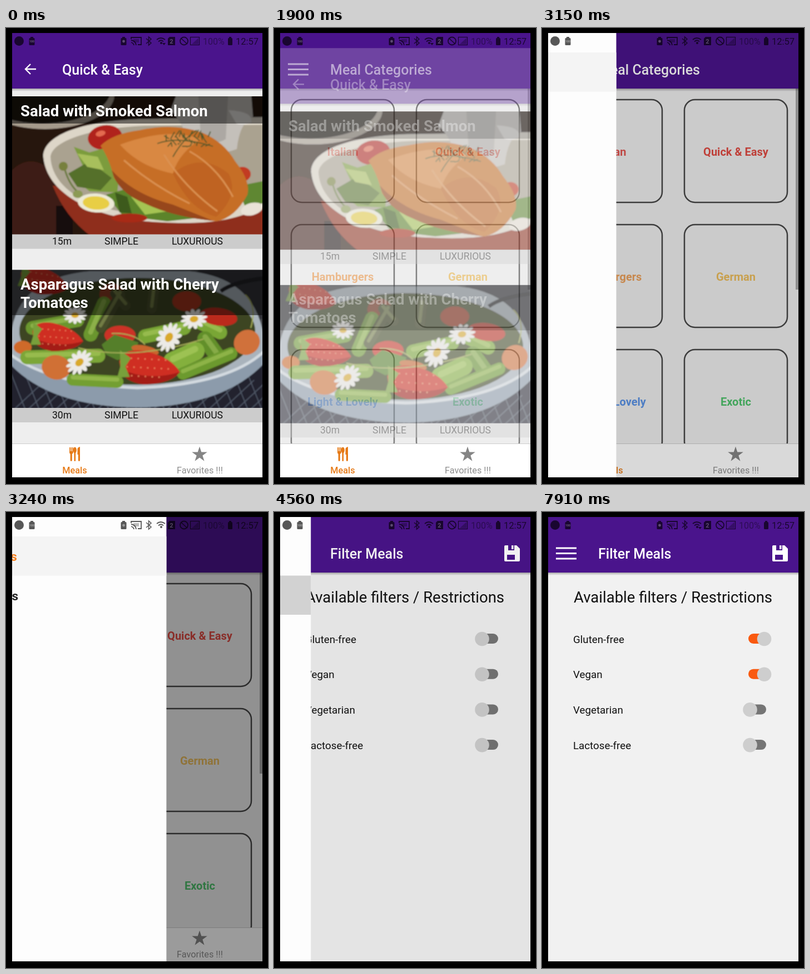
An HTML page that plays this animation: 471x821 px, repeating every 8000 ms.

```html
<!DOCTYPE html>
<html lang="en">
<head>
<meta charset="utf-8">
<title>Meals app</title>
<style>
html, body { margin: 0; width: 100%; height: 100%; overflow: hidden; background: #000; }
svg { display: block; font-family: Roboto, sans-serif; }
/* each layer of the leaving screen fades on its own */
#meals > * { opacity: var(--fade); }
#meals > .photo { opacity: var(--photo-fade); }
</style>
</head>
<body>
<svg id="stage" width="471" height="821" viewBox="0 0 471 821"></svg>
<script>
const LOOP = 8000, PURPLE = '#4a148c', ORANGE = '#f57f1e', TAB = '#e67a17';
const stage = document.getElementById('stage');

// markup helpers
const rect = (x, y, w, h, fill, more = '') => `<rect x="${x}" y="${y}" width="${w}" height="${h}" fill="${fill}" ${more}/>`;
const oval = (x, y, rx, ry, fill, turn = 0) => `<ellipse cx="${x}" cy="${y}" rx="${rx}" ry="${ry}" fill="${fill}" transform="rotate(${turn} ${x} ${y})"/>`;
const shape = (d, fill) => `<path d="${d}" fill="${fill}"/>`;
const line = (d, stroke, w, more = '') => `<path d="${d}" fill="none" stroke="${stroke}" stroke-width="${w}" ${more}/>`;
const text = (x, y, size, fill, str, weight = 400, anchor = 'start', more = '') =>
  `<text x="${x}" y="${y}" font-size="${size}" fill="${fill}" font-weight="${weight}" text-anchor="${anchor}" ${more}>${str}</text>`;
const group = (id, body, more = '') => `<g id="${id}" ${more}>${body}</g>`;
const stalk = (d, color, w) => line(d, color, w, 'stroke-linecap="round"') +
  line(d, 'rgba(215,235,130,.3)', w / 3, 'stroke-linecap="round" transform="translate(0 -4)"');

const header = (title, icon) =>
  rect(11, 109, 450, 5, 'url(#shade)') + rect(11, 9, 450, 100, PURPLE) + icon + text(101, 84, 25, '#fff', title, 500);
const burger = line('M25 65H62M25 74.5H62M25 84H62', '#fff', 3);
const arrow = line('M54 74H35M44 65L35 74L44 83', '#fff', 2.4);
const disk = shape('M416 60H436L442 66V87Q442 89 440 89H416Q414 89 414 87V62Q414 60 416 60Z', '#fff') +
  rect(419, 77, 14, 9, PURPLE) + rect(421, 60, 11, 9, PURPLE) + rect(427, 60, 3.5, 7, '#fff');

const meal = (y, photo, titleLines, duration) => {
  const bar = y + 248.5;
  return `<g class="photo"><svg x="11" y="${y}" width="450" height="249" viewBox="11 ${y} 450 249"><g filter="url(#soft)">${photo}</g></svg></g>` +
    rect(11, y, 450, 16.5 + 32.5 * titleLines.length, '#000', 'fill-opacity=".5"') +
    titleLines.map((s, i) => text(26, y + 35.5 + 32.5 * i, 27.5, '#fff', s, 700)).join('') +
    rect(11, bar, 450, 26, '#ccc') +
    text(83, bar + 18.5, 17.5, '#111', duration) +
    text(177, bar + 18.5, 17.5, '#111', 'SIMPLE') +
    text(298, bar + 18.5, 17.5, '#111', 'LUXURIOUS');
};

function dill() {
  let d = '';
  for (let i = 0; i < 30; i++) {
    const x = 288 + i * 2.6, y = 205 + 9 * Math.sin(i * 1.9);
    d += `M${x} ${y}l${9 * Math.sin(i * 2.4)} ${-13 * Math.abs(Math.cos(i))}`;
  }
  return line(d + 'M272 208Q310 194 372 213M300 232Q318 200 343 184', '#45552a', 1.8);
}

const salmonPhoto =
  rect(0, 110, 480, 270, '#27140e') +
  oval(70, 120, 125, 62, '#a49a8b') + oval(66, 112, 122, 60, '#1d1310') +
  oval(45, 330, 60, 90, '#3d1f12') + rect(90, 320, 30, 60, '#120b0a') +
  shape('M84 284Q108 345 160 380H480V306Z', '#8f2d1b') +
  shape('M67 232C66 195 130 168 240 164L480 160V312C420 348 360 354 280 350C170 346 74 305 67 232Z', '#ddd6c8') +
  shape('M80 232C82 204 150 180 250 176L480 174V280Q350 340 230 334C130 322 82 280 80 232Z', '#aaa290') +
  shape('M310 110H440L444 160Q420 170 415 218Q370 235 330 210Q318 170 296 148Z', '#c4c0ba') +
  shape('M345 110H400L395 200Q370 215 350 195Z', '#aca8a3') +
  shape('M400 148Q445 150 441 170Q425 176 414 172Z', '#e6e3df') +
  oval(178, 197, 31, 22, '#b0241a', -8) + oval(170, 190, 9, 5, '#e46a50', -15) +
  shape('M122 214L150 224L178 216L205 250L200 296L150 294L112 262L138 248Z', '#7c9c3c') +
  shape('M112 262L150 240L190 270L170 292L128 286Z', '#546f2a') +
  shape('M128 226L165 232L176 256L146 250Z', '#a8bf5c') +
  line('M104 248Q112 282 132 298', '#697a3c', 3) + oval(103, 249, 8, 8, '#77803c') + oval(129, 299, 9, 7, '#8c9a54') +
  shape('M180 300L215 290L260 310L345 318L362 340L290 348L210 338Z', '#5b8429') +
  shape('M225 304L262 300L292 330L250 336Z', '#a5c452') + shape('M196 296L218 304L226 334L204 332Z', '#3c5a1e') +
  shape('M415 285L480 272V312L430 322Z', '#5e8730') +
  oval(425, 263, 15, 13, '#c23a22') + oval(222, 342, 32, 8, '#a82a18') +
  oval(162, 315, 33, 17, '#ecead6', 4) + oval(162, 315, 24, 12, '#e8ce45', 4) +
  shape('M170 212Q192 190 240 184Q300 170 352 188Q392 205 412 240Q440 275 434 300Q412 342 378 348Q318 342 268 322Q212 298 194 270Q186 235 170 212Z', '#c66e26') +
  shape('M205 210Q290 178 350 200Q310 226 300 262Q240 250 205 210Z', '#d98843') +
  shape('M300 262Q350 222 400 262Q420 300 378 340Q330 328 300 262Z', '#bf6420') +
  shape('M190 256Q230 300 300 318L372 347Q300 340 250 316Q200 296 190 256Z', '#97461a') +
  line('M212 238Q262 282 330 316M284 228Q320 286 380 330M330 222Q380 250 408 304', '#da9252', 3) +
  oval(442, 326, 20, 11, '#e9e2d6', -15) + dill();

const berry = (x, y, s, turn) => `<g transform="translate(${x} ${y}) rotate(${turn}) scale(${s})">` +
  shape('M-48 -8Q-44 -30 -10 -27Q34 -20 50 4Q36 24 -8 27Q-44 24 -48 -8Z', '#cf2f24') +
  shape('M-46 4Q0 22 50 4Q36 24 -8 27Q-40 24 -46 4Z', '#a31d18') +
  line('M-30 -14H28M-36 0H40M-28 14H24', '#ef8a62', 2.2, 'stroke-dasharray="2 9"') +
  shape('M-48 -26L-30 -14L-38 0L-30 16L-50 18L-46 0Z', '#78a03a') + '</g>';

function daisy(x, y, r, turn) {
  let petals = '';
  for (let a = 0; a < 360; a += 30) petals += `<ellipse cy="${r * -.62}" rx="${r * .17}" ry="${r * .4}" fill="#eceae6" transform="rotate(${a})"/>`;
  return `<g transform="translate(${x} ${y}) rotate(${turn}) scale(1 .75)">${petals}<circle r="${r * .32}" fill="#d9a92c"/></g>`;
}

function cloth() {
  let d = '';
  for (let i = 0; i < 19; i++) d += `M${11 + i * 25} 690l-34 -86M${11 + i * 25} 690l60 -56`;
  return rect(0, 590, 480, 105, '#20242f') + line(d, '#565e6e', 1.4);
}

const asparagusPhoto =
  rect(0, 425, 480, 270, '#44474b') + oval(420, 470, 90, 60, '#303338') + cloth() +
  shape('M8 560Q16 450 150 438H330Q450 450 464 560V600Q390 682 236 683Q80 682 8 600Z', '#a9b3bc') +
  shape('M8 588Q80 642 236 648Q400 642 464 582V604Q390 682 236 683Q80 682 8 606Z', '#8c9bab') +
  line('M8 588Q80 642 236 648Q400 642 464 582', '#d3dae0', 5) +
  oval(236, 546, 212, 96, '#3d4522') +
  line('M470 450Q410 456 386 474', '#202225', 7) +
  berry(68, 456, .9, 10) + oval(325, 492, 26, 18, '#a3351f') + oval(190, 480, 22, 20, '#8c3a20') +
  stalk('M48 540L128 526M152 552L176 496', '#6b962f', 25) +
  stalk('M170 540L205 480M215 500L196 478M262 505L266 470', '#464d2a', 18) +
  stalk('M250 555L320 540M345 528L385 548', '#79a636', 25) +
  stalk('M358 560L378 588', '#628f2c', 28) +
  oval(30, 575, 16, 12, '#cf6a2c') + oval(433, 566, 24, 22, '#d0713a', -35) +
  oval(382, 520, 34, 16, '#bb291d', 8) +
  stalk('M38 593L166 590', '#7ba637', 25) + stalk('M120 633L200 637', '#739f30', 22) +
  stalk('M300 600L340 582', '#84b03e', 34) + stalk('M318 622L405 586', '#6c9a2d', 22) +
  berry(92, 557, .94, 4) + oval(205, 553, 28, 17, '#cc3325') +
  shape('M172 570L195 552L238 566L230 590L200 598L180 588Z', '#547f2c') +
  oval(250, 580, 25, 8, '#c9662e', 12) + berry(257, 612, 1.12, 3) +
  oval(90, 611, 26, 22, '#d07034', 10) +
  line('M130 576Q230 600 355 560M190 550Q230 548 250 570M430 480Q452 500 440 540', '#a6ad58', 2) +
  daisy(124, 517, 21, 0) + daisy(132, 602, 26, -40) + daisy(293, 557, 28, -60) + daisy(338, 524, 24, -10);

const categories = [
  ['Italian', '#e0534f'], ['Quick &amp; Easy', '#e04a42'], ['Hamburgers', '#eaa05c'],
  ['German', '#ebbc5c'], ['Light &amp; Lovely', '#5b93e6'], ['Exotic', '#4fc26c']
].map(([name, color], i) => {
  const x = 31 + 225 * (i % 2), y = 129 + 225 * (i >> 1);
  return rect(x, y, 185, 185, 'none', 'rx="19" stroke="#464646" stroke-width="2.5"') +
    text(x + 92.5, y + 101, 20, color, name, 700, 'middle');
}).join('');

const star = Array.from({ length: 10 }, (_, i) => {
  const r = i % 2 ? 5.6 : 14.5, a = i * Math.PI / 5;
  return `${348 + r * Math.sin(a)},${768 - r * Math.cos(a)}`;
}).join(' ');
const tabs = rect(11, 748, 450, 61, '#fff') + rect(11, 748, 450, 1, '#ccc') +
  shape('M114 755h1.6v7h1v-7h1.6v7h1v-7h1.6v9q0 2-2 3v11q0 2-1.6 2t-1.6-2v-11q-1.6-1-1.6-3Z', TAB) +
  oval(123.8, 760, 3, 5.5, TAB) + rect(122.5, 763, 2.6, 17, TAB, 'rx="1.3"') +
  shape('M128.5 758q0-3 4.5-4v24q0 2-1.6 2t-1.6-2v-10h-1.3Z', TAB) +
  text(123.5, 802, 16.25, TAB, 'Meals', 500, 'middle') +
  `<polygon points="${star}" fill="#858585"/>` +
  text(348.5, 802, 16.25, '#8e8e8e', 'Favorites !!!', 400, 'middle');

const filters = ['Gluten-free', 'Vegan', 'Vegetarian', 'Lactose-free'].map((name, i) => {
  const y = 228 + i * 63.7;
  return text(56, y + 7.5, 18.75, '#111', name) +
    rect(371, y - 9, 32, 18, '#757575', `id="track${i}" rx="9"`) +
    `<circle id="halo${i}" cx="399" cy="${y + .5}" r="0" opacity="0"/>` +
    `<circle id="thumb${i}" cx="374" cy="${y + .5}" r="12.8" fill="#cecece"/>`;
}).join('');

const battery = (x, y, w, h) => rect(x + w / 4, y, w / 2, 2, '#000') + rect(x, y + 2, w, h - 2, '#000', 'rx="1.5"');
const status = `<circle cx="23.5" cy="23.5" r="8.5"/>` +
  battery(41.5, 16, 10, 15) + text(46.5, 26, 5, '#fff', '100', 700, 'middle', 'opacity=".5"') +
  battery(206.5, 16, 10, 15) + oval(211.5, 24, 2.4, 2.4, 'rgba(255,255,255,.4)') +
  line('M225 20V17H243V30H237M225 22Q233 23 234 31M225 26Q229 27 230 31', '#000', 1.8) + rect(229, 20, 10, 6, '#000', 'opacity=".4"') +
  line('M252 19L261 27L256.5 31V16L261 20L252 28', '#000', 1.5) +
  line('M271 21Q278 15 286 21M274 24.5Q279 20 283 24.5', '#000', 1.8) + oval(279, 27, 2, 2, '#000') +
  group('traffic', shape('M281 27h6l-3 4Z', '#000')) +
  shape('M294 16H304V31H291V19Z', '#000') + text(297.5, 28, 11, '#fff', '2', 700, 'middle', 'opacity=".4"') +
  line('M314 18L326 29', '#000', 1.6) + '<circle cx="320" cy="23.5" r="7" fill="none" stroke="#000" stroke-width="1.8"/>' +
  rect(331.5, 16.5, 16, 14, 'none', 'stroke="#000" stroke-width="1.2"') + shape('M334 29L346 18V29Z', 'rgba(0,0,0,.4)') +
  text(354, 30, 16, '#000', '100%', 400, 'start', 'opacity=".6"') +
  battery(399, 16, 8, 15) + text(413, 30, 16.5, '#000', '12:57');

stage.innerHTML =
  `<defs><clipPath id="screen">${rect(11, 9, 450, 800, '#000')}</clipPath>
  <filter id="soft"><feGaussianBlur stdDeviation="1"/></filter>
  <linearGradient id="shade" x2="0" y2="1"><stop stop-color="#000" stop-opacity=".3"/><stop offset="1" stop-color="#000" stop-opacity="0"/></linearGradient></defs>` +
  rect(0, 0, 471, 821, '#000') +
  group('phone',
    group('home',
      rect(11, 9, 450, 800, '#eee') + categories + header('Meal Categories', burger) +
      rect(456, 109, 5, 362, '#000', 'id="scrollbar"') +
      group('backing', rect(11, 9, 450, 800, '#eee')) +
      group('meals',
        meal(123, salmonPhoto, ['Salad with Smoked Salmon'], '15m') +
        meal(435.5, asparagusPhoto, ['Asparagus Salad with Cherry', 'Tomatoes'], '30m') +
        header('Quick &amp; Easy', '<circle id="press" cx="43" cy="74" r="0"/>' + arrow)) +
      tabs) +
    group('filters', rect(11, 9, 450, 800, '#f1f1f1') + header('Filter Meals', burger + disk) +
      text(235.5, 163, 27.5, '#111', 'Available filters / Restrictions', 400, 'middle') + filters) +
    rect(11, 9, 450, 800, '#000', 'id="dim"') +
    group('drawer', rect(11, 9, 350, 800, '#fdfdfd') +
      rect(11, 44, 350, 70.5, '#f4f4f4', 'id="active"') +
      rect(11, 114.5, 350, 70.5, '#000', 'id="tap"') +
      text(31, 88, 22.5, ORANGE, 'Meals', 700, 'start', 'id="itemMeals"') +
      text(31, 159, 22.5, '#222', 'Filters', 700, 'start', 'id="itemFilters"')) +
    group('status', status, 'opacity=".65"'),
    'clip-path="url(#screen)"');

const nodes = {};
stage.querySelectorAll('[id]').forEach(n => nodes[n.id] = n);
const set = (id, attrs) => { for (const k in attrs) nodes[id].setAttribute(k, attrs[k]); };
const show = (id, on) => set(id, { display: on ? 'inline' : 'none' });
const ramp = (t, from, to) => Math.min(1, Math.max(0, (t - from) / (to - from)));
// critically damped spring, 0 to 1
const spring = ms => { const x = Math.max(0, ms) * 0.019; return x > 10 ? 1 : 1 - (1 + x) * Math.exp(-x); };

const BACK = 1390, LEAVE = 1850, LEFT = 1960, OPEN = 3086, TAP = 4160, CLOSE = 4387;

function toggle(i, t, at) {
  const on = t >= at;
  set('track' + i, { fill: on ? '#f9590f' : '#757575' });
  set('thumb' + i, { cx: on ? 399.5 : 374 });
  set('halo' + i, {
    r: 13 + 7 * ramp(t, at + 40, at + 200),
    opacity: 0.1 * ramp(t, at + 40, at + 120) * (1 - ramp(t, at + 220, at + 390))
  });
}

function draw(t) {
  // back to the categories
  const gone = ramp(t, LEAVE, LEFT), alpha = (1 - gone) ** 1.7;
  const moved = `translate(0 ${59 * gone})`;
  set('backing', { transform: moved, opacity: alpha });
  set('meals', { transform: moved, style: `--fade:${alpha};--photo-fade:${alpha ** 0.6}` });
  show('backing', gone < 1);
  show('meals', gone < 1);
  set('press', {
    r: 30 * Math.sqrt(ramp(t, BACK, BACK + 220)),
    'fill-opacity': 0.2 * ramp(t, BACK, BACK + 100) * (1 - ramp(t, BACK + 230, LEAVE))
  });
  set('scrollbar', { opacity: 0.3 * (1 - ramp(t, 3300, 3640)) });

  // drawer
  const out = t < CLOSE ? spring(t - OPEN) : 1 - spring(t - CLOSE);
  const onFilters = t >= CLOSE;
  set('drawer', { transform: `translate(${350 * (out - 1)} 0)` });
  show('drawer', out > 0);
  set('dim', { opacity: 0.52 * out ** 1.2 });
  set('active', { y: onFilters ? 114.5 : 44 });
  set('tap', { opacity: 0.14 * ramp(t, TAP, CLOSE - 60) });
  set('itemMeals', { fill: onFilters ? '#222' : ORANGE });
  set('itemFilters', { fill: onFilters ? ORANGE : '#222' });
  show('home', !onFilters);
  show('filters', onFilters);

  toggle(0, t, 5870);
  toggle(1, t, 7520);
  show('traffic', t < 2840 || t >= 7180);
}

const start = performance.now();
function tick() {
  draw((performance.now() - start) % LOOP);
  requestAnimationFrame(tick);
}
tick();
</script>
</body>
</html>
```
